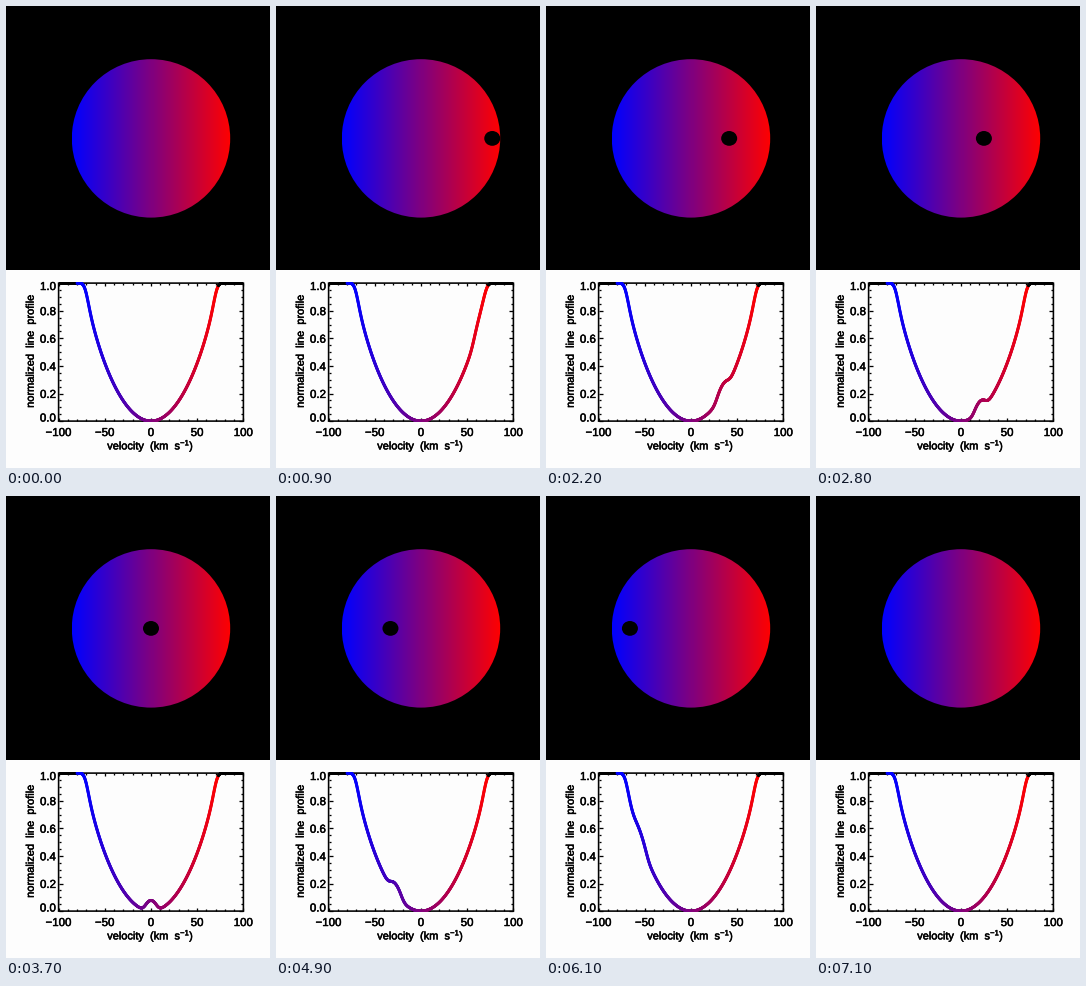
Recreate the animation shown at these times as a matplotlib script. Size 264x462 px, loop 7.5 s.

```python
import numpy as np
import matplotlib.pyplot as plt
from matplotlib.animation import FuncAnimation
from matplotlib.collections import LineCollection
from matplotlib.patches import Circle, Ellipse, Rectangle
from matplotlib.patheffects import withStroke

W, H, DPI = 264, 462, 66
PX = 72 / DPI  # points per pixel
FRAMES, STEP = 75, 100

plt.rcParams.update({
    "font.family": "Liberation Sans",
    "font.size": 11.5 * PX,
    "mathtext.fontset": "custom",
    "mathtext.rm": "Liberation Sans",
    "mathtext.default": "regular",
})

# Star and planet, in pixels
CX, CY, R = 145, 132.4, 79.2
PLANET_W, PLANET_H = 16, 14.8
MID_FRAME, SPEED = 37, 2.545

# Line profile, in km/s
V_ROT, BLUR, LIMB, BUMP = 70.5, 2.8, 0.6, 0.077
V_BLUE, V_RED = -80, 73  # range of the coloured part
v = np.linspace(-100, 100, 801)
x = v / V_ROT


def to_x(vel):
    return 145 + 0.924 * vel


def to_y(p):
    return 415.1 - 138 * p


kernel = np.exp(-0.5 * (np.arange(-15, 15.01, 0.25) / BLUR) ** 2)
kernel /= kernel.sum()


def blur(a):
    return np.convolve(a, kernel, mode="same")


mu2 = np.clip(1 - x**2, 0, None)
column = blur((1 - LIMB) * np.sqrt(mu2) + LIMB * mu2)
column /= column.max()
brightness = np.where(mu2 > 0, 1 - LIMB + LIMB * np.sqrt(mu2), 0)


def shadow(pos):
    """Light blocked by the planet centred at pos (in stellar radii)."""
    chord = np.sqrt(np.clip(1 - ((x - pos) / 0.1) ** 2, 0, None))
    return blur(chord * brightness)


SCALE = BUMP / shadow(0).max()


def segments(pos):
    profile = 1 - column + SCALE * shadow(pos)
    pts = np.column_stack([to_x(v), to_y(profile)])
    return np.stack([pts[:-1], pts[1:]], axis=1)


def doppler(t):
    t = np.clip(t, 0, 1)
    return np.stack([t, 0 * t, 1 - t], axis=-1)


fig = plt.figure(figsize=(W / DPI, H / DPI), dpi=DPI, facecolor="#fdfdfd")
ax = fig.add_axes([0, 0, 1, 1])
ax.axis("off")

# Transit view
ax.add_patch(Rectangle((0, 0), W, 264, fc="black", lw=0))
disc = ax.imshow(doppler(np.linspace(0, 1, 158))[None], aspect="auto",
                 extent=(CX - R, CX + R, CY + R, CY - R),
                 interpolation="nearest", zorder=2)
ax.set(xlim=(0, W), ylim=(H, 0))
disc.set_clip_path(Circle((CX, CY), R, transform=ax.transData))
planet = Ellipse((CX, CY), PLANET_W, PLANET_H, fc="black", lw=0, zorder=3)
ax.add_patch(planet)

# Plot frame and ticks
x0, x1, y0, y1 = to_x(-100), to_x(100), to_y(0), to_y(1)
ax.add_patch(Rectangle((x0, y1), x1 - x0, y0 - y1, fill=False, ec="black",
                       lw=1.6 * PX, snap=False, zorder=4))

ticks = []
for i in range(21):
    tx, n = to_x(10 * i - 100), 3 if i % 5 == 0 else 1.7
    ticks += [[(tx, y0), (tx, y0 - n)], [(tx, y1), (tx, y1 + n)]]
    ty, n = to_y(i / 20), 4 if i % 4 == 0 else 2.2
    ticks += [[(x0, ty), (x0 + n, ty)], [(x1, ty), (x1 - n, ty)]]
ax.add_collection(LineCollection(ticks, colors="black", linewidths=1.3 * PX,
                                 zorder=4))


def label(px, py, text, **kw):
    ax.text(px, py, text, path_effects=[withStroke(linewidth=0.5 * PX,
                                                   foreground="black")], **kw)


for vel in range(-100, 101, 50):
    label(to_x(vel), 430, str(vel).replace("-", "\u2212"), ha="center")
for i in range(6):
    base = {0: 415.5, 5: 284}.get(i, to_y(i / 5) + 4.4)
    label(50, base, f"{i / 5:.1f}", ha="right")
label(144.7, 443.5, "velocity  (km  s$^{-1}$)", ha="center", size=11 * PX)
label(24.7, 345, "normalized  line  profile", rotation=90,
      ha="center", va="center", size=11 * PX)

# Coloured profile
mid = (v[:-1] + v[1:]) / 2
colors = doppler((mid / V_RED + 1) / 2)
colors[(mid < V_BLUE) | (mid > V_RED)] = 0
curve = LineCollection(segments(2), colors=colors, linewidths=3 * PX,
                       capstyle="round", zorder=5)
ax.add_collection(curve)
curve.set_clip_path(Rectangle((x0, y1 - 0.7), x1 - x0, y0 - y1 + 1.4,
                              transform=ax.transData))


def update(n):
    offset = SPEED * (MID_FRAME - n)
    transit = 4 <= n <= 70
    planet.center = (CX + offset, CY)
    planet.set_visible(transit)
    curve.set_segments(segments(offset / R if transit else 2))
    return planet, curve


anim = FuncAnimation(fig, update, frames=FRAMES, interval=STEP,
                     repeat=True, repeat_delay=0, blit=False)
plt.show()
```
